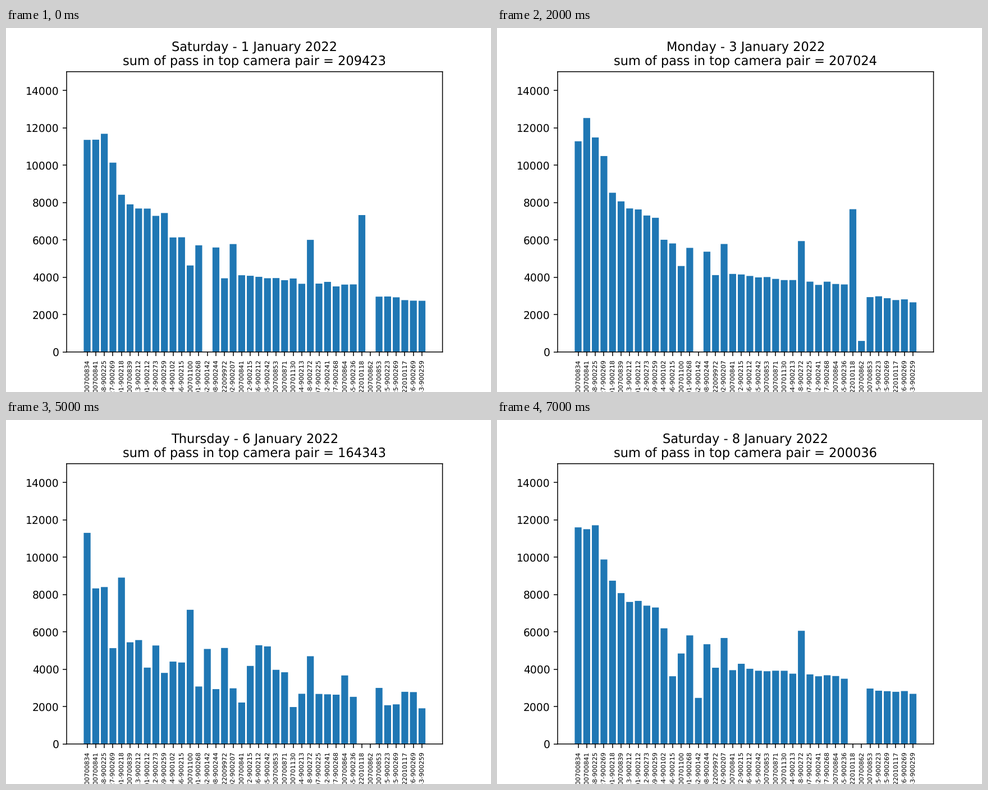
These frames come from a looping animation (864x648 px, 8 s). A matplotlib script:

```python
import matplotlib.pyplot as plt
import numpy as np
from matplotlib.animation import FuncAnimation

# Smooth rendering: exact text advances and unsnapped edges
plt.rcParams.update({"text.hinting": "none", "path.snap": False})

DAYS = ["Saturday", "Sunday", "Monday", "Tuesday", "Wednesday", "Thursday", "Friday"]
TOTALS = [209423, 208951, 207024, 207318, 206486, 164343, 167795, 200036]

PAIRS = """
    00700834 00700841 68-900225 27-900269 91-900218 00700839 13-900212 01-900212
    12-900273 69-900259 44-900102 66-900215 00701100 01-900268 62-900142 08-900244
    22009972 02-900207 00700841 72-900215 36-900212 35-900242 00700853 00700871
    00701130 64-900213 48-900272 07-900225 42-900241 77-900268 00700864 65-900236
    22010118 00700862 00700853 25-900223 25-900269 22010117 26-900269 43-900259
""".split()
COUNT = len(PAIRS)
BARS = np.arange(1, COUNT + 1)

# Key points of the falling curve of passes
CURVE = {1: 11500, 3: 11300, 5: 8700, 6: 7900, 10: 7400, 11: 6100, 16: 5350,
         17: 4100, 20: 4150, 24: 3850, 32: 3600, 35: 2950, 40: 2750}
PEAKS = {13: 4600, 18: 5650, 27: 6000}

# On quiet days most bars shrink to 0.72; these groups behave otherwise
QUIET = {1.25: [13, 17, 21, 22, 27],
         1.0: [1, 5, 15, 20, 23, 24, 31, 35, 38, 39],
         0.53: [4, 8, 10, 14, 16, 19, 25]}
DROPS = {5: 10, 8: 12}

curve = np.interp(BARS, list(CURVE), list(CURVE.values()))
jitter = 1 + 0.02 * np.random.default_rng(4).standard_normal((len(TOTALS), COUNT))


def passes(day):
    values = curve.copy()
    if day in (6, 7):
        factor = np.full(COUNT, 0.72)
        for scale, group in QUIET.items():
            factor[np.array(group) - 1] = scale
        values *= factor
    else:
        for bar, value in PEAKS.items():
            values[bar - 1] = value
    if 3 <= day <= 5:
        values[1] *= 1.1
    if day in DROPS:
        values[DROPS[day] - 1] *= 0.6

    # Cameras that come and go during the week
    values[14] = np.interp(day, [3, 5, 7, 8], [0, 5720, 4610, 2400])
    values[32] = 7550 if day <= 4 else 0
    values[33] = np.interp(day, [2, 3, 5, 6], [0, 590, 970, 0])
    return values * jitter[day - 1]


fig, ax = plt.subplots(figsize=(6.4, 4.8), dpi=135)
bars = ax.bar(BARS, passes(1))
ax.set_ylim(0, 15000)
labels = [("9002" if "-" in pair else "1") + pair for pair in PAIRS]
ax.set_xticks(BARS, labels, rotation=90, fontsize=6)


def update(i):
    for bar, height in zip(bars, passes(i + 1)):
        bar.set_height(height)
    ax.set_title(f"{DAYS[i % 7]} - {i + 1} January 2022\n"
                 f"sum of pass in top camera pair = {TOTALS[i]}")
    return bars


anim = FuncAnimation(fig, update, frames=len(TOTALS), interval=1000, repeat=True)
plt.show()
```
